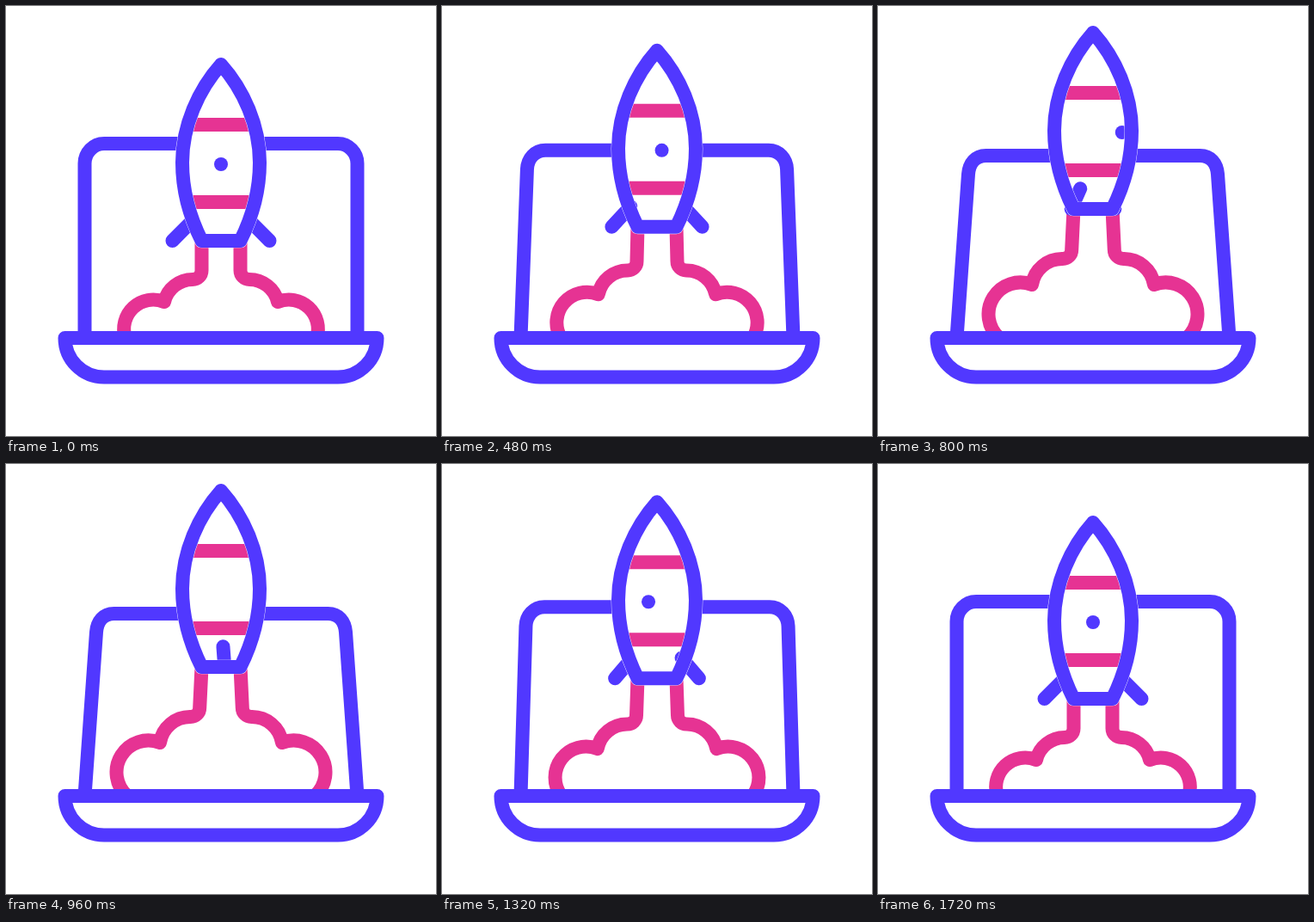
An HTML page for the animation above (2000 ms loop, 500 by 500 pixels).

```html
<!DOCTYPE html>
<html lang="en">
<head>
<meta charset="utf-8">
<title>Rocket launch</title>
<style>
  html, body { margin: 0; width: 100%; height: 100%; overflow: hidden; background: #fff; }
  svg { display: block; width: 100vw; height: 100vh; }
  .line { fill: none; stroke-width: 16; stroke-linecap: round; stroke-linejoin: round; }
  .blue { stroke: #5138ff; }
  .pink { stroke: #e63393; }
  .rim { fill: none; stroke: #fff; stroke-width: 16.7; stroke-linejoin: round; }
</style>
</head>
<body>
<svg viewBox="0 0 500 500">
  <defs>
    <path id="hull" d="M250 68C224 97 205 139 205 182C205 214 214 246 227.5 273H272.5C286 246 295 214 295 182C295 139 276 97 250 68Z"/>
    <clipPath id="inside"><use href="#hull"/></clipPath>
  </defs>
  <path id="screen" class="line blue"/>
  <path id="smokeL" class="line pink"/>
  <path id="smokeR" class="line pink" transform="translate(500 0) scale(-1 1)"/>
  <path class="line blue" d="M68.5 386H431.5A45.5 45.5 0 0 1 386 431.5H114A45.5 45.5 0 0 1 68.5 386Z"/>
  <g id="rocket">
    <path id="finBack" class="line blue"/>
    <use href="#hull" fill="#fff"/>
    <g clip-path="url(#inside)">
      <path class="line pink" d="M205 138H295M205 228H295"/>
      <circle id="dotOut" cy="184" r="8" fill="#5138ff"/>
      <circle id="dotIn" cy="184" r="8" fill="#5138ff"/>
    </g>
    <path id="finFront" class="line blue"/>
    <use href="#hull" class="rim"/>
    <use href="#hull" class="line blue"/>
  </g>
</svg>
<script>
  const LOOP = 2000, STEP = 40;
  const SPIN_START = 160, SPIN_END = 1720;
  const $ = id => document.getElementById(id);
  const set = (id, name, value) => $(id).setAttribute(name, value);

  const ramp = (t, a, b) => Math.min(1, Math.max(0, (t - a) / (b - a)));
  const smooth = u => u * u * (3 - 2 * u);
  const easePow = (u, n) => u < 0.5 ? (2 * u) ** n / 2 : 1 - (2 - 2 * u) ** n / 2;
  const rise = (t, a, b, c, d) => smooth(ramp(t, a, b)) - smooth(ramp(t, c, d));

  function screenPath(k) {
    const x1 = 91.5 + 13.5 * k, y1 = 183 + 12.5 * k;
    const x2 = 114 + 11.5 * k, y2 = 160 + 14 * k;
    const c = 12.4;
    return `M91.5 386L${x1} ${y1}C${x1 + k} ${y1 - c} ${x2 - c} ${y2} ${x2} ${y2}` +
      `H${500 - x2}C${500 - x2 + c} ${y2} ${500 - x1 - k} ${y1 - c} ${500 - x1} ${y1}L408.5 386`;
  }

  // Left half of the exhaust: stack, upper puff, lower puff.
  function smokePath(k) {
    const x = 227.5 - 2.3 * k, y = 318 - 24 * k;
    const bend = 10.5, r1 = 34 + 1.4 * k, r2 = 34 + 3 * k;
    const cx = 171 - 6 * k, cy = 375 - 17 * k;
    const endX = cx - Math.sqrt(r2 * r2 - (386 - cy) ** 2);
    return `M227.5 ${273 - 37 * k}L${x} ${y - bend}` +
      `A${bend} ${bend} 0 0 1 ${x - bend} ${y}` +
      `A${r1} ${r1} 0 0 0 ${184 - 5 * k} ${344 - 20 * k}` +
      `A${r2} ${r2} 0 0 0 ${endX} 386`;
  }

  const finPath = side => `M${250 + 56.5 * side} 273L${250 + 33 * side} 249.3`;

  function draw(t) {
    const lift = rise(t, 230, 775, 1112, 1627);
    const tilt = rise(t, 160, 760, 985, 1605);
    const u = ramp(t, SPIN_START, SPIN_END);
    const side = 2 * easePow(u, 3) - 1;
    const shift = 113 * easePow(u, 2.6);

    set('screen', 'd', screenPath(tilt));
    set('smokeL', 'd', smokePath(lift));
    set('smokeR', 'd', smokePath(lift));
    set('rocket', 'transform', `translate(0 ${-37 * lift})`);
    set('finFront', 'd', finPath(side));
    set('finBack', 'd', finPath(-side));
    set('dotOut', 'cx', 250 + shift);
    set('dotIn', 'cx', 137 + shift);
  }

  const start = performance.now();
  function tick() {
    const t = (performance.now() - start) % LOOP;
    draw(Math.floor(t / STEP) * STEP);
    requestAnimationFrame(tick);
  }
  tick();
</script>
</body>
</html>
```
